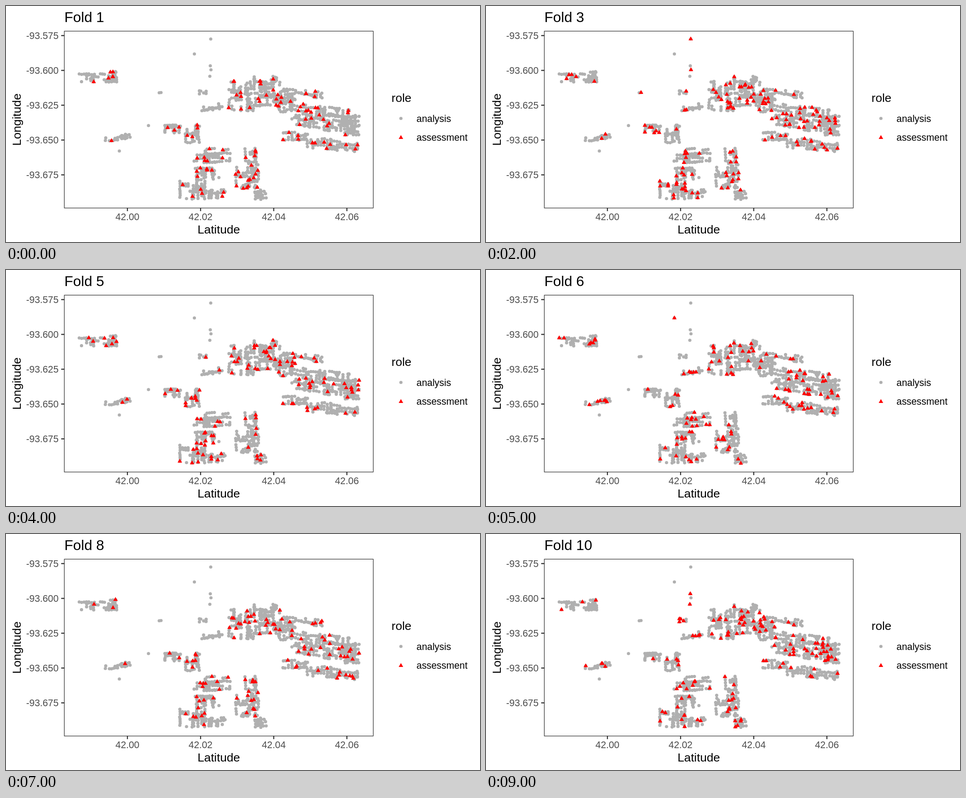
An HTML page with a canvas for the animation above (10 s loop, 1058 by 529 pixels).

```html
<!DOCTYPE html>
<html lang="en">
<head>
<meta charset="utf-8">
<title>Cross-validation folds</title>
<style>
  html, body { margin: 0; width: 100%; height: 100%; overflow: hidden; background: #fff; }
  canvas { display: block; }
</style>
</head>
<body>
<canvas id="plot" width="1058" height="529"></canvas>
<script>
const ctx = document.getElementById('plot').getContext('2d');
const FOLDS = 10, FOLD_MS = 1000, HOMES_PER_PIXEL = 0.024;
const GREY = '#b0b0b0', RED = '#ff0000', BLACK = '#000', LABEL = '#4d4d4d', LINE = '#333';
const panel = { left: 130.2, top: 56.4, right: 819.7, bottom: 452.8 };

let seed = 42;
function random() {
  seed = (seed + 0x6d2b79f5) | 0;
  let n = Math.imul(seed ^ (seed >>> 15), 1 | seed);
  n = (n + Math.imul(n ^ (n >>> 7), 61 | n)) ^ n;
  return ((n ^ (n >>> 14)) >>> 0) / 4294967296;
}
const between = (low, high) => low + random() * (high - low);

const homes = [];
const addHome = (x, y, fold = 1 + Math.floor(random() * FOLDS)) => homes.push({ x, y, fold });

// Fills a tilted box around (cx, cy) with short streets of evenly spaced homes.
function addArea(cx, cy, width, height, tilt = 0) {
  let left = Math.round((width + 4) * (height + 4) * HOMES_PER_PIXEL);
  while (left > 0) {
    const alongX = random() < 0.5;
    const gap = between(4.5, 7);
    let u = between(-width / 2, width / 2);
    let v = between(-height / 2, height / 2);
    for (let n = Math.ceil(between(1, 5)); n > 0 && left > 0; n--) {
      if (u > width / 2 || v > height / 2) break;
      addHome(cx + u, cy + v + u * tilt);
      left--;
      u += alongX ? gap : between(-1, 1);
      v += alongX ? between(-1, 1) : gap;
    }
  }
}

function buildTown() {
  // North-west and west
  addArea(204, 159, 86, 24);
  addArea(246, 297, 64, 12, -0.2);
  addArea(372, 275, 42, 20);
  addArea(417, 287, 36, 40);
  addArea(437, 193, 20, 8);
  addArea(460, 228, 46, 16, -0.15);
  // Centre and east
  addArea(521, 201, 54, 68);
  addArea(582, 196, 66, 80);
  addArea(630, 211, 40, 54);
  addArea(676, 195, 62, 14, 0.25);
  addArea(703, 249, 130, 56, 0.15);
  addArea(764, 268, 50, 46);
  addArea(645, 292, 60, 18);
  addArea(730, 311, 116, 24, 0.08);
  // South
  addArea(461, 336, 84, 32);
  addArea(449, 375, 58, 28);
  addArea(417, 411, 60, 44);
  addArea(466, 421, 46, 20);
  addArea(545, 338, 28, 38);
  addArea(538, 382, 52, 54);
  addArea(567, 420, 28, 28);
  // Isolated homes
  addHome(457, 74, 3);
  addHome(420.5, 107.5, 6);
  addHome(456, 134, 10);
  addHome(457.5, 143, 3);
  addHome(455, 157.5, 10);
  addHome(342, 194.5, 9);
  addHome(346, 194, 3);
  addHome(318, 268, 2);
  addHome(253, 325, 4);
}

function text(string, x, y, size, color = BLACK, align = 'left') {
  ctx.font = `${size}px "Liberation Sans", Arial, sans-serif`;
  ctx.fillStyle = color;
  ctx.textAlign = align;
  ctx.fillText(string, x, y);
}

function dot({ x, y }) {
  ctx.fillStyle = GREY;
  ctx.beginPath();
  ctx.arc(x, y, 3.6, 0, Math.PI * 2);
  ctx.fill();
}

function triangle({ x, y }) {
  ctx.fillStyle = RED;
  ctx.beginPath();
  ctx.moveTo(x, y - 5.8);
  ctx.lineTo(x + 5, y + 2.9);
  ctx.lineTo(x - 5, y + 2.9);
  ctx.fill();
}

function tick(x1, y1, x2, y2) {
  ctx.lineWidth = 2.4;
  ctx.beginPath();
  ctx.moveTo(x1, y1);
  ctx.lineTo(x2, y2);
  ctx.stroke();
}

function drawAxes() {
  const { left, top, right, bottom } = panel;
  const midX = (left + right) / 2, midY = (top + bottom) / 2;
  ctx.strokeStyle = LINE;
  ctx.lineWidth = 1.3;
  ctx.strokeRect(left, top, right - left, bottom - top);
  for (let i = 0; i < 5; i++) {
    const y = 66.3 + i * 78.05;
    tick(left - 7, y, left, y);
    text((-93.575 - i * 0.025).toFixed(3), 117.3, Math.round(y + 7.6), 21.33, LABEL, 'right');
  }
  for (let i = 0; i < 4; i++) {
    const x = 271 + i * 163.3;
    tick(x, bottom, x, bottom + 7);
    text((42 + i * 0.02).toFixed(2), x, 480, 21.33, LABEL, 'center');
  }
  text('Latitude', midX, 510, 26.67, BLACK, 'center');
  ctx.save();
  ctx.translate(33, midY);
  ctx.rotate(-Math.PI / 2);
  text('Longitude', 0, 0, 26.67, BLACK, 'center');
  ctx.restore();
}

function drawLegend() {
  text('role', 860.5, 215, 26.67);
  dot({ x: 881.5, y: 252 });
  text('analysis', 916.3, 260, 21.33);
  triangle({ x: 881.5, y: 295 });
  text('assessment', 916.3, 302, 21.33);
}

function draw(fold) {
  ctx.fillStyle = '#fff';
  ctx.fillRect(0, 0, 1058, 529);
  homes.forEach(dot);
  homes.filter(home => home.fold === fold).forEach(triangle);
  drawAxes();
  drawLegend();
  text(`Fold ${fold}`, panel.left, 36, 32);
}

buildTown();
const start = performance.now();
let shown = 0;
function frame() {
  const fold = Math.floor((performance.now() - start) / FOLD_MS) % FOLDS + 1;
  if (fold !== shown) draw(shown = fold);
  requestAnimationFrame(frame);
}
frame();
</script>
</body>
</html>
```
